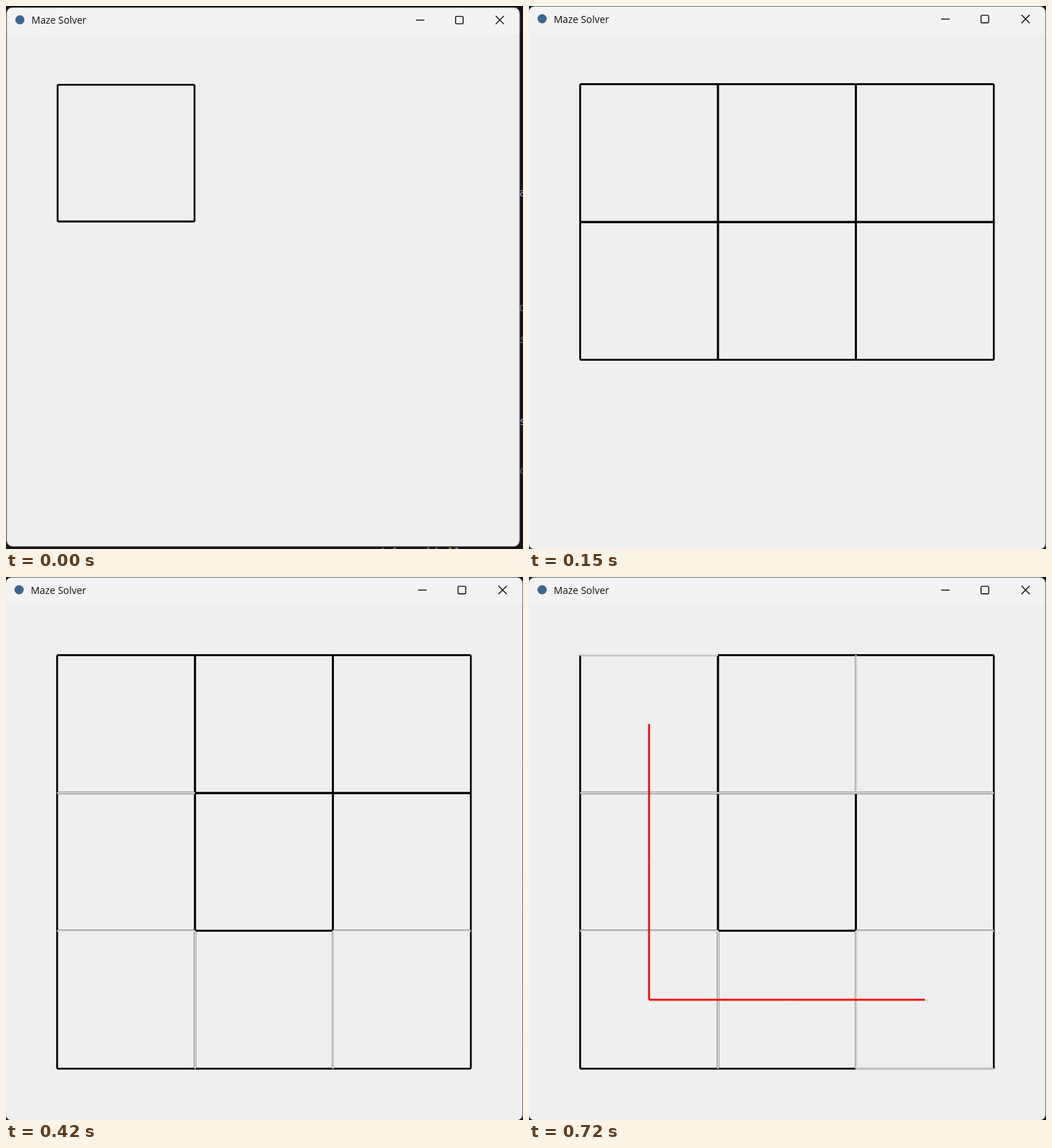
Recreate the animation shown at these times as an HTML page. Size 730 by 767 pixels, loop 750 ms.

```html
<!DOCTYPE html>
<html lang="en">
<head>
<meta charset="utf-8">
<title>Maze Solver</title>
<style>
  html, body { margin: 0; width: 100%; height: 100%; overflow: hidden; background: #151518; }
  svg { display: block; width: 730px; height: 767px; }
  .title { font: 13.9px "Open Sans", "Noto Sans", sans-serif; fill: #111; }
  .code { font: 15px "DejaVu Sans Mono", monospace; }
  .dim { font-style: italic; fill: #66666b; }
  .key { fill: #c586d8; }
  .icon { fill: none; stroke: #111; stroke-width: 1.4; }
  #maze path { fill: none; stroke-width: 2.6; }
</style>
</head>
<body>
<svg viewBox="0 0 730 767">
  <rect width="730" height="767" fill="#151518"/>
  <g class="code">
    <text class="key" x="725" y="269">a</text>
    <text class="dim" x="724.5" y="431">p</text>
    <text class="dim" x="725" y="476">s</text>
    <text class="key" x="725" y="592">s</text>
    <text class="dim" x="725" y="661">c</text>
    <text class="key" x="525" y="777">def</text>
    <text x="575" y="777" fill="#8a8a90">self</text>
    <text x="624" y="777" fill="#d8b93c">ll</text>
  </g>
  <g id="win">
    <rect x="-.5" y=".5" width="730" height="767.1" rx="8.5" fill="#efefef"/>
    <path d="M-.5 38.5V9a8.5 8.5 0 0 1 8.5-8.5H721a8.5 8.5 0 0 1 8.5 8.5V38.5Z" fill="#f3f3f3"/>
    <rect x="-.5" y=".5" width="730" height="767.1" rx="8.5" fill="none" stroke="#66666a" stroke-width=".8"/>
    <circle cx="18.5" cy="18" r="6.5" fill="#3a6791"/>
    <text class="title" x="35" y="23.6">Maze Solver</text>
    <path class="icon" d="M582 18.5H594" stroke-width="1.2"/>
    <rect class="icon" x="638.3" y="13.1" width="10.8" height="10.6" rx="1.5"/>
    <path class="icon" d="M695.4 12.6L707 24.2M707 12.6L695.4 24.2"/>
    <g id="maze"></g>
  </g>
</svg>
<script>
const LOOP = 750, STEP = 30, SIZE = 3;
const LEFT = 72.2, TOP = 110.4, CELL = 194.7;
const maze = document.getElementById('maze');

const px = c => LEFT + c * CELL;
const py = r => TOP + r * CELL;
const seg = (c1, r1, c2, r2) => `M${px(c1)} ${py(r1)}L${px(c2)} ${py(r2)}`;

// Adds a stroke that stays hidden until the given time in each loop.
function stroke(d, color, time) {
  const path = document.createElementNS('http://www.w3.org/2000/svg', 'path');
  path.setAttribute('d', d);
  path.setAttribute('stroke', color);
  maze.append(path);
  if (time > 0) {
    path.animate([
      { opacity: 0, offset: 0, easing: 'step-end' },
      { opacity: 1, offset: time / LOOP },
      { opacity: 1, offset: 1 }
    ], { duration: LOOP, iterations: Infinity });
  }
}

// Cells, row by row
for (let i = 0; i < SIZE * SIZE; i++) {
  const c = i % SIZE, r = Math.floor(i / SIZE);
  const walls = seg(c, r, c, r + 1) + seg(c, r, c + 1, r) +
    seg(c + 1, r, c + 1, r + 1) + seg(c, r + 1, c + 1, r + 1);
  stroke(walls, '#000', i * STEP);
}

// Opened walls in carving order, then entrance and exit: column, row, direction
const openings = [
  [0, 1, 'h'], [0, 2, 'h'], [1, 2, 'v'], [2, 2, 'v'], [2, 2, 'h'],
  [2, 1, 'h'], [2, 0, 'v'], [1, 1, 'h'], [0, 0, 'h'], [2, 3, 'h']
];
openings.forEach(([c, r, dir], i) => {
  const d = dir === 'h' ? seg(c, r, c + 1, r) : seg(c, r, c, r + 1);
  stroke(d, '#d9d9d9', 300 + i * STEP);
});

// Route through cell centres
const route = [[0, 0], [0, 1], [0, 2], [1, 2], [2, 2]];
route.slice(1).forEach(([c, r], i) => {
  const [c0, r0] = route[i];
  stroke(seg(c0 + .5, r0 + .5, c + .5, r + .5), '#f00', 630 + i * STEP);
});

// The window opens slightly smaller
document.getElementById('win').animate([
  { transform: 'translate(1.26px, 1.6px) scale(.9925)', offset: 0, easing: 'step-end' },
  { transform: 'none', offset: STEP / LOOP },
  { transform: 'none', offset: 1 }
], { duration: LOOP, iterations: Infinity });
</script>
</body>
</html>
```
